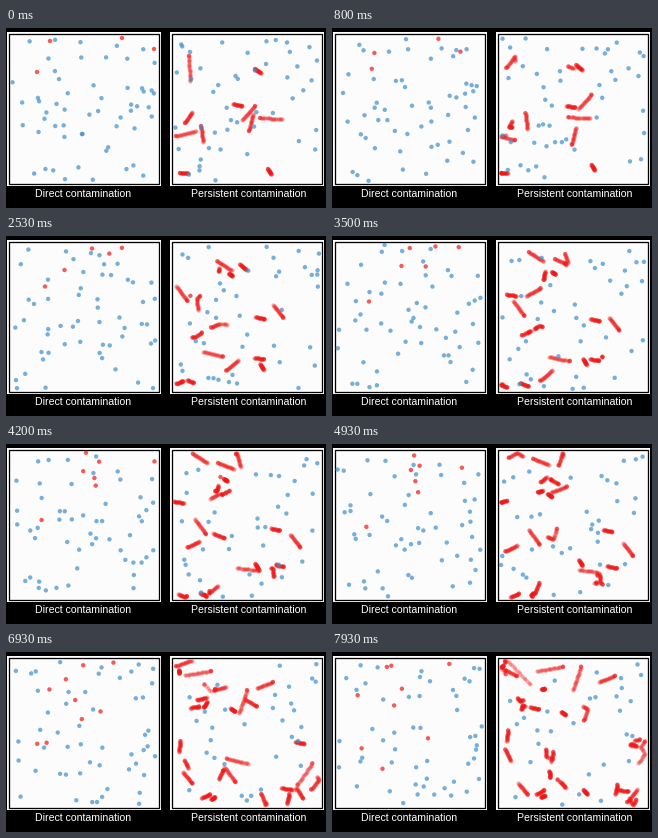
A matplotlib script for the animation above (8 s loop, 320 by 180 pixels).

```python
import numpy as np
import matplotlib.pyplot as plt
from matplotlib.animation import FuncAnimation
from matplotlib.patches import Rectangle

W, H, DPI = 320, 180, 100
FRAMES, STEP = 160, 50          # 8 s loop
TRAIL = 20                      # a trace stays for one second
TOTAL = TRAIL + FRAMES
PT = 72 / DPI
BLUE, RED = (0.24, 0.56, 0.80), (0.94, 0.09, 0.09)
LEFT, RIGHT, TOP, SIDE = 0.5, 163.5, 3.5, 154.5
MARGIN, CONTACT, SPEED = 5, 4.5, 0.6

# Carriers at the start: where each comes from and where it heads, one second apart
DIRECT = [[46, 19, 44, 4], [20, 48, 31, 44], [128, 9, 116, 10], [146, 18, 152, -4]]
PERSISTENT = [[184, 53, 183, 28], [255, 45, 249, 41], [227, 76, 236, 78],
              [236, 92, 249, 78], [247, 86, 243, 103], [276, 91, 254, 90],
              [186, 84, 179, 95], [197, 114, 195, 98], [190, 103, 170, 108],
              [182, 145, 174, 145], [265, 146, 262, 141]]


def collide(pos, vel):
    """Elastic contacts between discs of equal mass."""
    gap = pos[:, None] - pos
    near = np.triu((gap ** 2).sum(2) < CONTACT ** 2, 1)
    for a, b in np.argwhere(near):
        normal = gap[a, b] / (np.hypot(*gap[a, b]) + 1e-9)
        push = (vel[a] - vel[b]) @ normal
        if push < 0:
            vel[a] -= push * normal
            vel[b] += push * normal


def simulate(seed, carriers, count, growth, x0):
    """Paths of all discs and the step at which each becomes a carrier."""
    rng = np.random.default_rng(seed)
    lo = np.array([x0, TOP]) + MARGIN
    hi = np.array([x0, TOP]) + SIDE - MARGIN
    lead = np.array(carriers, float)
    free = rng.uniform(lo, hi, (count - len(lead), 2))
    pos = np.concatenate([lead[:, :2], free])
    vel = np.concatenate([(lead[:, 2:] - lead[:, :2]) / TRAIL,
                          rng.normal(0, SPEED, free.shape)])
    onset = np.full(count, TOTAL)
    onset[:len(lead)] = 0
    path = []
    for step in range(TOTAL):
        path.append(pos.copy())
        if step >= TRAIL:
            collide(pos, vel)
            sick = onset <= step
            due = len(lead) + growth * (step - TRAIL) * STEP / 1000
            if sick.sum() < int(due):
                # the healthy disc closest to a carrier is next
                dist = np.linalg.norm(pos[:, None] - pos[sick], axis=2).min(1)
                dist[sick] = np.inf
                onset[dist.argmin()] = step
        pos = pos + vel
        vel = np.where(pos < lo, abs(vel), np.where(pos > hi, -abs(vel), vel))
        pos = np.where(pos < lo, 2 * lo - pos, np.where(pos > hi, 2 * hi - pos, pos))
    return np.stack(path, 1), onset


direct, direct_onset = simulate(4, DIRECT, 60, 0.75, LEFT)
persistent, persistent_onset = simulate(11, PERSISTENT, 58, 2.4, RIGHT)

fig = plt.figure(figsize=(W / DPI, H / DPI), dpi=DPI, facecolor="black")
ax = fig.add_axes([0, 0, 1, 1])
ax.set_xlim(0, W)
ax.set_ylim(H, 0)
ax.axis("off")


def panel(x, label, center):
    ax.add_patch(Rectangle((x, TOP), SIDE, SIDE, fc="white", lw=0))
    box = Rectangle((x + 2.5, TOP + 2.5), SIDE - 5, SIDE - 5,
                    fc="#fcfcfc", ec="black", lw=1.3 * PT)
    ax.add_patch(box)
    ax.text(center, 169, label, color="white", ha="center", va="baseline",
            family="Liberation Sans", size=10.5 * PT)
    return box


def dots(size, box, z):
    s = ax.scatter([], [], s=(size * PT) ** 2, lw=0, zorder=z)
    s.set_clip_path(box)
    return s


left_box = panel(LEFT, "Direct contamination", 77)
right_box = panel(RIGHT, "Persistent contamination", 243)
left_dots = dots(4.4, left_box, 4)
traces = dots(4.2, right_box, 4)
traces.set_facecolor((*RED, 0.33))
right_dots = dots(4.4, right_box, 5)


def place(artist, pos, sick):
    artist.set_offsets(pos)
    artist.set_facecolor([(*(RED if s else BLUE), 0.7) for s in sick])


def draw(k):
    now = k + TRAIL
    place(left_dots, direct[:, now], direct_onset <= now)
    place(right_dots, persistent[:, now], persistent_onset <= now)
    past = np.arange(k, now)
    marked = persistent_onset[:, None] <= past
    traces.set_offsets(persistent[:, past][marked])
    return left_dots, traces, right_dots


anim = FuncAnimation(fig, draw, frames=FRAMES, interval=STEP, repeat=True,
                     repeat_delay=0, init_func=lambda: draw(0), blit=False)
plt.show()
```
